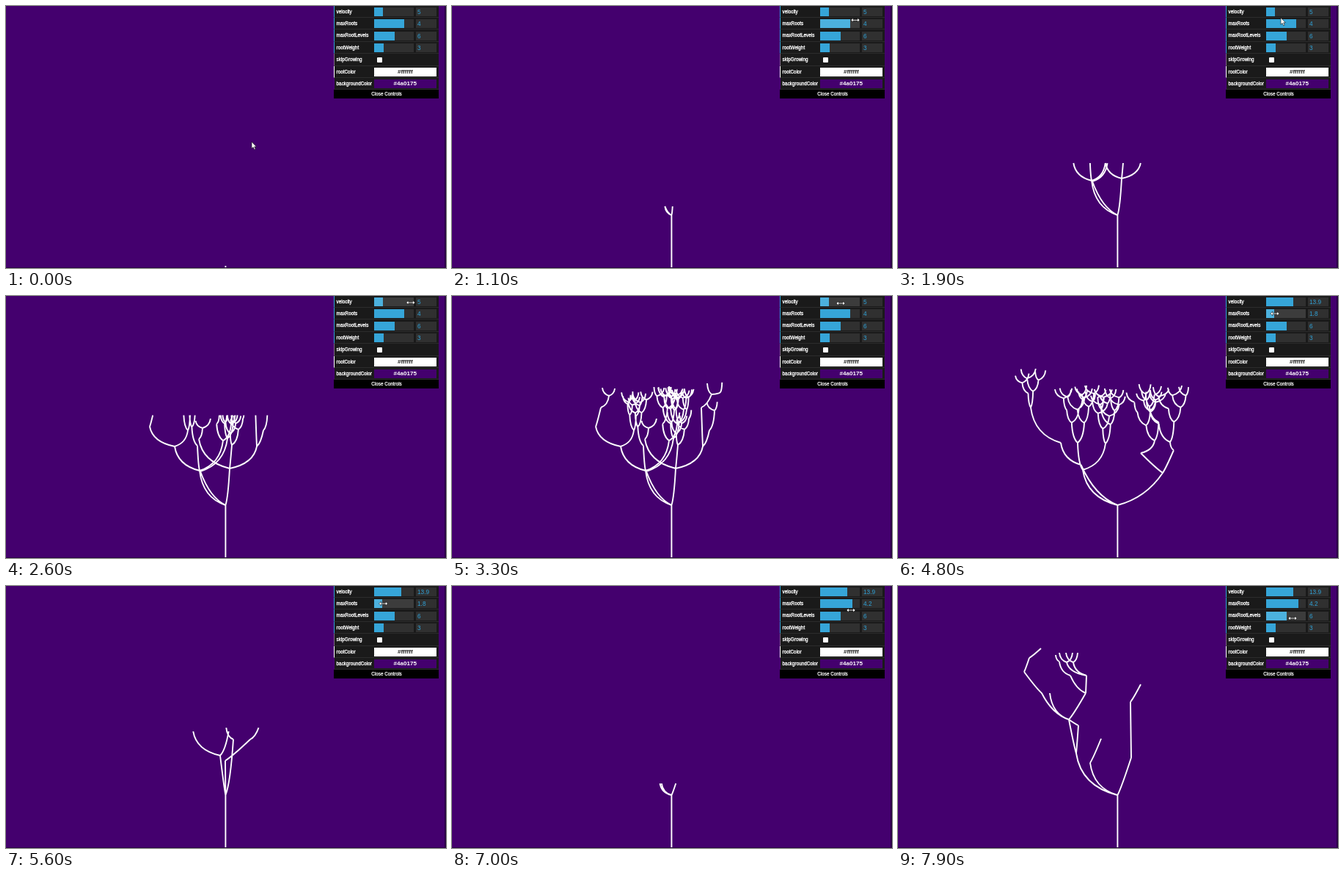
Write an HTML page with a canvas that moves like this. It is 600x357 px and loops after 8 s.

```html
<!DOCTYPE html>
<html lang="en">
<head>
<meta charset="utf-8">
<title>Growing roots</title>
<style>
  html, body { margin: 0; width: 100%; height: 100%; overflow: hidden; background: #44006e; }
  #stage { position: relative; width: 600px; height: 357px; overflow: hidden; background: #44006e; }
  #stage::after { content: ""; position: absolute; inset: 0; border: solid #2a0345; border-width: 0 2px 1px 0; }
  canvas { position: absolute; left: 0; top: 0; }
  #panel { position: absolute; left: 447px; top: -.3px; width: 143px; font: 6.35px "Liberation Sans", Arial, sans-serif; color: #fff; }
  .row { position: relative; box-sizing: border-box; height: 16.36px; background: #1a1a1a; border-bottom: .7px solid #2c2c2c; border-left: 1.8px solid #2fa1d6; line-height: 15.8px; }
  .row > * { position: absolute; }
  .row label { left: 2.6px; -webkit-text-stroke: .3px #fff; }
  .bar { left: 54px; top: 2.2px; width: 54px; height: 12px; background: #303030; }
  .bar i { display: block; height: 100%; background: #36a5d8; }
  .hot { background: #3c3c3c; }
  .hot i { background: #4cb1de; }
  .num { left: 111px; top: 2.2px; width: 26px; height: 12px; padding-left: 2px; background: #303030; color: #2fa1d6; font-size: 8.3px; line-height: 12.8px; }
  .box { left: 57.7px; top: 4.4px; width: 7.4px; height: 7.4px; border-radius: 1px; background: #fff; }
  .swatch { left: 53.5px; top: 2px; width: 85.5px; height: 12.3px; font-weight: bold; font-size: 8.1px; line-height: 12.8px; text-align: center; }
  #close { height: 12px; line-height: 12.4px; text-align: center; text-indent: 1px; background: #000; -webkit-text-stroke: .25px #fff; }
  svg { position: absolute; left: 0; top: 0; overflow: visible; }
</style>
</head>
<body>
<div id="stage">
  <canvas id="tree" width="600" height="357"></canvas>
  <div id="panel">
    <div class="row"><label>velocity</label><div class="bar"><i></i></div><div class="num"></div></div>
    <div class="row"><label>maxRoots</label><div class="bar"><i></i></div><div class="num"></div></div>
    <div class="row"><label>maxRootLevels</label><div class="bar"><i></i></div><div class="num"></div></div>
    <div class="row"><label>rootWeight</label><div class="bar"><i></i></div><div class="num"></div></div>
    <div class="row" style="border-left-color:#806787"><label>skipGrowing</label><div class="box"></div></div>
    <div class="row" style="border-left-color:#fff"><label>rootColor</label><div class="swatch" style="background:#fff;color:#222">#ffffff</div></div>
    <div class="row" style="border-left-color:#4a0175"><label>backgroundColor</label><div class="swatch" style="background:#44006e">#4a0175</div></div>
    <div id="close">Close Controls</div>
  </div>
  <svg width="1" height="1" id="cursor">
    <path id="arrow" d="M0 0V9.3L2.1 7.3L3.7 10.8L5.2 10.1L3.7 6.8H6.4Z" fill="#fff" stroke="#111" stroke-width=".6"/>
    <path id="resize" d="M-6 0L-3 -2.8V-.8H3V-2.8L6 0L3 2.8V.8H-3V2.8Z" fill="#fff" stroke="#111" stroke-width=".6"/>
  </svg>
</div>
<script>
const LOOP = 8000, STEP = 100, GROUND = 357, TRUNK = 299.4, FORK = 285;
const SLOW = 0.0737, FAST = 0.208; // growth in px per ms
const clamp = (v, a, b) => Math.min(b, Math.max(a, v));
const mix = (a, b, s) => a + (b - a) * s;

let seed = 5;
const rand = (a, b) => {
  seed = (seed * 16807) % 2147483647;
  return mix(a, b, seed / 2147483647);
};

const node = (x, y, ...kids) => ({ x, y, kids });
const straight = n => ({ ...n, bow: 0.3 });
const soft = n => ({ ...n, bow: 0.62 });
const late = (lag, n) => ({ ...n, lag });

// Forks a node again and again; the twigs get shorter with each level.
function grow(levels, x, y, spread = 11) {
  const n = node(x, y);
  if (!levels) return n;
  const first = rand(0, 1) < 0.5 ? -1 : 1;
  const sides = rand(0, 1) < 0.8 ? [first, -first] : [first];
  n.kids = sides.map(side => grow(levels - 1,
    x + side * rand(0.2, 1) * spread,
    y - rand(0.8, 1.15) * (8 + 4 * levels), spread));
  return n;
}

function makeTree(start, speed, ...kids) {
  const parts = [];
  (function flatten(n, x0, y0, lag) {
    lag = n.lag ?? lag;
    parts.push({ x0, y0, dx: n.x - x0, dy: n.y - y0, bow: n.bow ?? 0.88, lag });
    n.kids.forEach(k => flatten(k, n.x, n.y, lag));
  })(node(TRUNK, FORK, ...kids), TRUNK, GROUND, 0);
  return { start, speed, parts };
}

const trees = [
  makeTree(-40, SLOW,
    node(264, 238,
      node(230, 205, node(196, 178, straight(node(203, 152, grow(1, 214, 136)))), grow(3, 248, 183)),
      soft(grow(4, 261, 204)),
      grow(4, 296, 197)),
    soft(node(265, 239, grow(4, 302, 194))),
    soft(node(305, 235,
      node(263, 195, grow(1, 268, 180)),
      straight(grow(3, 308, 203)),
      node(342, 205,
        straight(node(340, 152, soft(node(354, 134, grow(0, 348, 119), grow(1, 366, 131))))),
        soft(node(351, 183, grow(1, 358, 156))))))),
  makeTree(3440, FAST,
    late(6, node(252, 237, grow(4, 245, 200, 14), grow(4, 283, 201, 14))),
    late(6, soft(node(249.5, 230, node(222, 200, grow(3, 181, 152, 14))))),
    soft(node(361, 241,
      straight(node(331, 214, grow(4, 350, 197, 14))),
      straight(node(376, 210, grow(4, 371, 199, 16)))))),
  makeTree(4812, FAST,
    late(5, straight(node(292, 231, node(254, 197, grow(2, 260, 170, 6)), soft(grow(2, 304, 197))))),
    soft(node(310, 209, grow(2, 299, 191))),
    straight(node(299, 238, straight(node(333, 209, soft(grow(2, 346, 191))))))),
  makeTree(6577, FAST,
    node(243, 228,
      straight(node(233, 182,
        soft(node(196, 146, straight(node(172, 117, straight(node(179, 98, straight(node(195, 85)))))))),
        late(62, node(207, 146)),
        straight(node(256, 146,
          soft(node(235, 122, node(220, 103, node(215, 94)))),
          straight(node(257, 122, node(230, 104, node(220, 91), node(238, 91)), node(239, 104, node(229, 91), node(245, 91)))))))),
      straight(node(246, 190, straight(node(233, 182))))),
    node(262, 241, late(124, straight(node(277, 208)))),
    straight(node(318, 234, straight(node(317, 158, late(50, straight(node(331, 134)))))))),
];

const ctx = document.getElementById("tree").getContext("2d");
ctx.strokeStyle = "#fff";
ctx.lineWidth = 1.9;

// Each branch swells from its fork as a scaled copy of its full curve.
function drawTree(t) {
  ctx.clearRect(0, 0, 600, GROUND);
  const tree = trees.filter(k => k.start <= t).pop();
  const top = GROUND - (t - tree.start) * tree.speed;
  ctx.beginPath();
  for (const { x0, y0, dx, dy, bow, lag } of tree.parts) {
    const s = clamp((top + lag - y0) / dy, 0, 1);
    if (!s) continue;
    ctx.moveTo(x0, y0);
    ctx.quadraticCurveTo(x0 + dx * s * bow, y0 + dy * s * 0.22, x0 + dx * s, y0 + dy * s);
  }
  ctx.stroke();
}

// Pointer route: time, x, y
const route = [
  [0, 335, 185], [700, 548, 7], [900, 557, 20], [1900, 522, 16], [2700, 556, 8],
  [3300, 530, 10], [3400, 539.7, 10], [4200, 541, 25], [4600, 543, 25], [4800, 513.8, 24],
  [5600, 514.5, 24], [6400, 546.2, 25], [7000, 544, 33], [7900, 538, 44],
];
function pointer(t) {
  const i = Math.max(1, route.findIndex(r => r[0] >= t));
  const [a, b] = [route[i - 1], route[i]];
  const s = (t - a[0]) / (b[0] - a[0]);
  return [mix(a[1], b[1], s), mix(a[2], b[2], s)];
}

const LEFT = 503, WIDTH = 54, ROW = 16.36;
const limits = [20, 5, 11, 10]; // every slider starts at 1
const bars = [...document.querySelectorAll(".bar")];
const nums = [...document.querySelectorAll(".num")];
const cursor = document.getElementById("cursor");
const arrow = document.getElementById("arrow"), resize = document.getElementById("resize");

function settings(t, x) {
  const at = max => Math.round(10 * mix(1, max, clamp((x - LEFT) / WIDTH, 0, 1))) / 10;
  const velocity = t < 3350 ? 5 : t < 3450 ? at(20) : 13.9;
  const roots = t < 4650 ? 4 : t < 4800 ? at(5) : t < 5650 ? 1.8 : t < 6400 ? at(5) : 4.2;
  return [velocity, roots, 6, 3];
}

function render(t) {
  drawTree(t);
  const [x, y] = pointer(t);
  const inside = x >= LEFT && x <= LEFT + WIDTH;
  let over = false;
  settings(t, x).forEach((v, i) => {
    const off = inside ? Math.abs(y - 7.9 - ROW * i) : ROW;
    over = over || off < 7.8;
    bars[i].classList.toggle("hot", off < 6.5);
    bars[i].firstChild.style.width = WIDTH * (v - 1) / (limits[i] - 1) + 0.5 + "px";
    nums[i].textContent = v;
  });
  cursor.style.transform = `translate(${x}px, ${y}px)`;
  arrow.style.display = over ? "none" : "";
  resize.style.display = over ? "" : "none";
}

const begin = performance.now();
function tick(now) {
  const t = Math.max(0, now - begin) % LOOP;
  render(Math.floor(t / STEP) * STEP);
  requestAnimationFrame(tick);
}
render(0);
requestAnimationFrame(tick);
</script>
</body>
</html>
```
